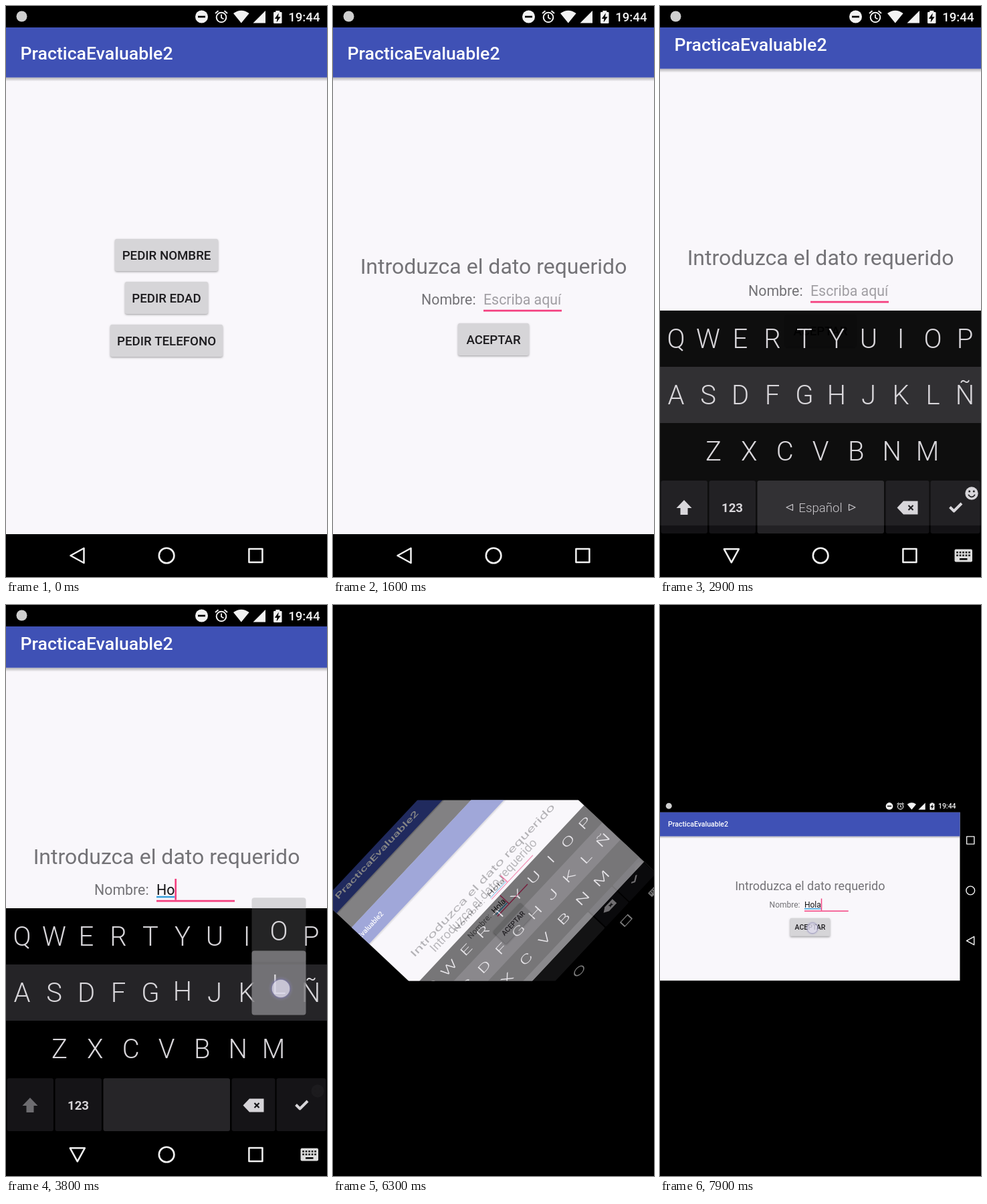
Recreate the animation shown at these times as an HTML page with a canvas. Size 480x853 px, loop 8000 ms.

```html
<!DOCTYPE html>
<html lang="es">
<head>
<meta charset="utf-8">
<title>PracticaEvaluable2</title>
<style>
html, body { margin: 0; width: 100%; height: 100%; overflow: hidden; background: #000; }
canvas { display: block; width: 480px; height: 853px; }
</style>
</head>
<body>
<canvas id="stage" width="480" height="853"></canvas>
<script>
const W = 480, H = 853, LOOP = 8000, STEP = 100;
const PAPER = '#f9f7fb', BAR = '#3f51b5', PINK = '#f43f7f', LIGHT = '#f2f2f2';
const PAN = 13;

const stage = document.getElementById('stage');
const screen = stage.getContext('2d');
const buffer = Object.assign(document.createElement('canvas'), { width: W, height: H }).getContext('2d');
let g = screen;

const clamp = v => Math.max(0, Math.min(1, v));
const lerp = (a, b, p) => a + (b - a) * p;
const ramp = (t, start, len) => clamp((t - start) / len);
const quint = p => 1 - Math.pow(1 - p, 5);
const within = (t, a, b) => t >= a && t < b;

// ---------- drawing helpers ----------

function box(x, y, w, h, fill, r = 0) {
  g.fillStyle = fill;
  g.beginPath();
  g.roundRect(x, y, w, h, r);
  g.fill();
}

function disc(x, y, r, fill) {
  g.fillStyle = fill;
  g.beginPath();
  g.arc(x, y, r, 0, 7);
  g.fill();
}

function ring(x, y, r, width, color, from = 0, to = 7) {
  g.strokeStyle = color;
  g.lineWidth = width;
  g.beginPath();
  g.arc(x, y, r, from, to);
  g.stroke();
}

function trace(pts, close) {
  g.beginPath();
  for (let i = 0; i < pts.length; i += 2) g.lineTo(pts[i], pts[i + 1]);
  if (close) g.closePath();
}

function poly(fill, ...pts) {
  trace(pts, true);
  g.fillStyle = fill;
  g.fill();
}

function line(color, width, close, ...pts) {
  trace(pts, close);
  g.strokeStyle = color;
  g.lineWidth = width;
  g.lineJoin = 'round';
  g.stroke();
}

function text(str, x, y, size, color, weight = 400, align = 'left') {
  g.font = `${weight} ${size}px Roboto, sans-serif`;
  g.textAlign = align;
  g.fillStyle = color;
  g.fillText(str, x, y);
}

function moved(dx, dy, draw) {
  g.save();
  g.translate(dx, dy);
  draw();
  g.restore();
}

// Draws a group with one shared opacity.
function faded(alpha, draw) {
  if (alpha <= 0) return;
  if (alpha >= 1) return draw();
  const main = g;
  buffer.resetTransform();
  buffer.clearRect(0, 0, W, H);
  buffer.setTransform(main.getTransform());
  g = buffer;
  draw();
  g = main;
  g.save();
  g.resetTransform();
  g.globalAlpha = alpha;
  g.drawImage(buffer.canvas, 0, 0);
  g.restore();
}

// ---------- system bars ----------

function statusBar(width) {
  box(0, 0, width, 32, '#000');
  disc(23.5, 15.5, 8, '#cfcfcf');
  moved(width - W, 0, () => {
    disc(292.5, 16, 9.5, LIGHT);
    box(287, 14.7, 11, 2.7, '#000');
    ring(322, 17, 7.3, 2, LIGHT);
    line(LIGHT, 1.8, false, 322, 12.5, 322, 17.5, 325.5, 19.5);
    line(LIGHT, 2, false, 313, 11, 317.5, 7.3);
    line(LIGHT, 2, false, 331, 11, 326.5, 7.3);
    g.fillStyle = LIGHT;
    g.beginPath();
    g.moveTo(351.8, 25.5);
    g.lineTo(340, 11);
    g.quadraticCurveTo(351.8, 2.5, 363.6, 11);
    g.fill();
    poly(LIGHT, 369.5, 25.5, 388, 25.5, 388, 7);
    box(400, 9, 12.5, 17, LIGHT, 1.3);
    box(403.3, 7, 6, 3, LIGHT);
    poly('#000', 407.8, 10.5, 401.8, 18.9, 405.4, 18.9, 404.6, 24.6, 410.6, 16.2, 407, 16.2);
    text('19:44', 469.5, 23, 18.67, LIGHT, 500, 'right');
  });
}

function backIcon(x, y, down) {
  g.save();
  g.translate(x, y);
  if (down) g.rotate(-Math.PI / 2);
  line(LIGHT, 2.5, true, -10.3, 0, 9.7, -11, 9.7, 11);
  g.restore();
}

function navIcons(at, down) {
  backIcon(...at(0), down);
  const [cx, cy] = at(1), [sx, sy] = at(2);
  ring(cx, cy, 11.3, 2.6, LIGHT);
  line(LIGHT, 2.5, true, sx - 10, sy - 10, sx + 10, sy - 10, sx + 10, sy + 10, sx - 10, sy + 10);
}

function navBar(open) {
  box(0, 789, W, 64, '#000');
  navIcons(i => [106.8 + i * 133.3, 821], open);
  if (!open) return;
  box(440.5, 811.5, 26.5, 19, '#dcdcdc', 2);
  for (let i = 0; i < 10; i++) box(443.3 + (i % 5) * 4.5, i < 5 ? 815 : 819.5, 2.5, 2.5, '#000');
  box(448, 825, 11.5, 2.5, '#000');
}

// ---------- app windows ----------

function page(width, height, barHeight, titleSize, baseline) {
  box(0, 0, width, 32, '#000');
  box(0, 32, width, height - 32, PAPER);
  const edge = 32 + barHeight;
  const shade = g.createLinearGradient(0, edge, 0, edge + 6);
  shade.addColorStop(0, 'rgba(0,0,0,.28)');
  shade.addColorStop(1, 'rgba(0,0,0,0)');
  box(0, edge, width, 6, shade);
  box(0, 32, width, barHeight, BAR);
  text('PracticaEvaluable2', 21.5, baseline, titleSize, '#fff', 500);
}

const tallPage = () => page(W, 789, 74.7, 26.67, 80);

function button(label, y, width, press = 0) {
  const x = 240 - width / 2;
  g.save();
  g.shadowColor = 'rgba(0,0,0,.35)';
  g.shadowBlur = 3;
  g.shadowOffsetY = 1.3;
  box(x, y, width, 48, '#d6d5d8', 2.7);
  g.restore();
  if (press) {
    g.save();
    g.beginPath();
    g.roundRect(x, y, width, 48, 2.7);
    g.clip();
    disc(240, y + 27, 20 + 70 * press, 'rgba(0,0,0,.12)');
    g.restore();
  }
  text(label, 240, y + 31, 18.67, '#1c1b1e', 500, 'center');
}

function menu(t) {
  tallPage();
  button('PEDIR NOMBRE', 348, 154, t >= 900 ? ramp(t, 800, 400) : 0);
  button('PEDIR EDAD', 412, 124);
  button('PEDIR TELEFONO', 476, 168);
}

function form(value, cursor) {
  text('Introduzca el dato requerido', 240, 400.2, 32, '#747377', 400, 'center');
  text('Nombre:', 132, 445.5, 21.33, '#737276');
  text(value || 'Escriba aquí', 225, 445.5, 21.33, value ? '#121113' : '#a09ea3');
  const end = value ? g.measureText(value).width : 0;
  if (value) box(225, 447.8, end, 2.6, '#39a0dc');
  box(225, 453.7, 117, 2.7, PINK);
  if (cursor) box(225 + end, 422, 2.6, 31.7, PINK);
  button('ACEPTAR', 474, 106);
}

// ---------- keyboard ----------

const ROWS = [
  { keys: 'QWERTYUIOP', x: 24, gap: 48, y: 495 },
  { keys: 'ASDFGHJKLÑ', x: 24, gap: 48, y: 579 },
  { keys: 'ZXCVBNM', x: 80, gap: 53.33, y: 663 }
];
const TAPS = [
  { key: 'H', down: 3200, up: 3400 },
  { key: 'O', down: 3600, up: 3700 },
  { key: 'L', down: 3800, up: 3900 },
  { key: 'A', down: 4000, up: 4100 }
];
const TYPED_END = 4300;

function spot(key) {
  const row = ROWS.find(r => r.keys.includes(key));
  return [row.x + row.gap * row.keys.indexOf(key), row.y];
}

const typed = t => 'Hola'.slice(0, TAPS.filter(k => t >= k.up).length);
const keyCap = (key, x, y) => text(key, x, y + 14.2, 40, '#d8d6da', 300, 'center');

function popup(tap, t) {
  const [x, y] = spot(tap.key);
  const since = Math.max(0, t - tap.up);
  const lift = 14.5 * Math.exp(-since / 260);
  const alpha = .85 * (1 - ramp(since, 0, 150));
  box(x - 40.5, y - lift - 48, 81, 96, `rgba(128,127,131,${alpha})`, 4);
  keyCap(tap.key, x, y - lift * .85);
}

function keyboard(t) {
  const active = TAPS.filter(k => t >= k.down && t < TYPED_END);
  box(0, 453, W, 336, '#000');
  box(0, 537, W, 84, '#252427');
  for (const row of ROWS)
    [...row.keys].forEach((key, i) => {
      if (!active.some(k => k.key === key)) keyCap(key, row.x + row.gap * i, row.y);
    });

  for (const [x, w] of [[1.5, 69.5], [73.5, 69.5], [337.5, 65], [404.5, 74]]) box(x, 707, w, 79, '#151417', 3);
  box(145.5, 707, 189.5, 79, '#262528', 3);

  poly(t < 3400 ? '#d8d6da' : '#6d6c70',
    36, 736, 47.5, 748, 41.5, 748, 41.5, 758, 30.5, 758, 30.5, 748, 24.5, 748);
  text('123', 108, 754, 18.67, '#d6d4d8', 600, 'center');
  poly('#d6d4d8', 354.5, 747.5, 364, 737.5, 385.5, 737.5, 385.5, 757.5, 364, 757.5);
  line('#151417', 2.2, false, 371.5, 744, 378.5, 751);
  line('#151417', 2.2, false, 378.5, 744, 371.5, 751);
  line('#d6d4d8', 4, false, 433.5, 746.5, 439.5, 752.5, 451, 741);

  const hint = 1 - ramp(t, 3300, 400);
  g.save();
  g.globalAlpha = hint;
  text('Español', 240, 753.5, 18.67, '#c9c7cb', 300, 'center');
  line('#c9c7cb', 1.2, true, 189, 747, 198.5, 742.5, 198.5, 751.5);
  line('#c9c7cb', 1.2, true, 292, 747, 282.5, 742.5, 282.5, 751.5);
  g.globalAlpha = Math.max(.04, hint);
  disc(466, 726, 9.7, '#d6d4d8');
  disc(462.7, 723, 1.5, '#151417');
  disc(469.3, 723, 1.5, '#151417');
  ring(466, 726.3, 5, 1.7, '#151417', .3, Math.PI - .3);
  g.restore();

  active.forEach(k => popup(k, t));
}

// ---------- touches ----------

function touch(x, y) {
  const glow = g.createRadialGradient(x, y, 12, x, y, 19);
  glow.addColorStop(0, 'rgba(140,135,190,.4)');
  glow.addColorStop(1, 'rgba(140,135,190,0)');
  disc(x, y, 19, glow);
  disc(x, y, 13.5, 'rgba(238,235,246,.66)');
  ring(x, y, 14, 1.5, 'rgba(120,116,165,.5)');
}

function touches(t) {
  if (within(t, 900, 1100)) touch(242, 375);
  if (within(t, 2300, 2500)) touch(281, 440);
  for (const k of TAPS)
    if (within(t, k.down, k.up)) {
      const [x, y] = spot(k.key);
      touch(x + 3, y - 6);
    }
}

// ---------- whole screens ----------

const cursorOn = t =>
  within(t, 2100, 2900) || within(t, 3400, 4500) || within(t, 5000, 7000) || t >= 7500;

function portrait(t) {
  const open = t >= 2800;
  box(0, 0, W, H, '#000');
  if (t < 1600) menu(t);
  const enter = quint(ramp(t, 1170, 350));
  const pan = PAN * quint(ramp(t, 2759, 140));
  faded(ramp(t, 1170, 200), () => moved(0, 68 * (1 - enter) - pan, () => {
    tallPage();
    form(typed(t), cursorOn(t));
  }));
  const rise = 33 * (1 - quint(ramp(t, 2759, 330)));
  faded(ramp(t, 2759, 150), () => moved(0, rise, () => keyboard(t)));
  statusBar(W);
  navBar(open);
  touches(t);
}

function landscape(t) {
  box(0, 0, H, W, '#000');
  page(797, W, 64, 18.67, 70.7);
  moved(158.7, -160.5, () => form('Hola', cursorOn(t)));
  statusBar(797);
  navIcons(i => [825, 373.3 - i * 133.3], false);
  if (t >= 7900) touch(405, 340);
}

function rotated(t) {
  const p = quint(ramp(t, 6251, 400));
  const s = W / H, cx = W / 2, cy = H / 2;
  const turn = -(1 - p) * Math.PI / 2;
  g.save();
  g.beginPath();
  g.rect(0, cy - W * s / 2, W, W * s);
  g.clip();
  g.translate(cx, cy);
  g.rotate(turn);

  if (p > 0) {
    g.save();
    g.scale(s, s);
    const half = lerp(cx, cy, p);
    g.beginPath();
    g.rect(-half, -cx, half * 2, W);
    g.clip();
    g.translate(-cy, -cx);
    landscape(t);
    g.restore();
  }

  g.scale(s * lerp(1, H / W, p), s * lerp(1, W / H, p));
  g.translate(-cx, -cy);
  faded(1 - p, () => portrait(5200));
  g.restore();
}

function frame(now) {
  const t = Math.floor((now % LOOP) / STEP) * STEP;
  g = screen;
  g.resetTransform();
  box(0, 0, W, H, '#000');
  if (t < 5300) portrait(t);
  else rotated(t);
  requestAnimationFrame(frame);
}
requestAnimationFrame(frame);
</script>
</body>
</html>
```
